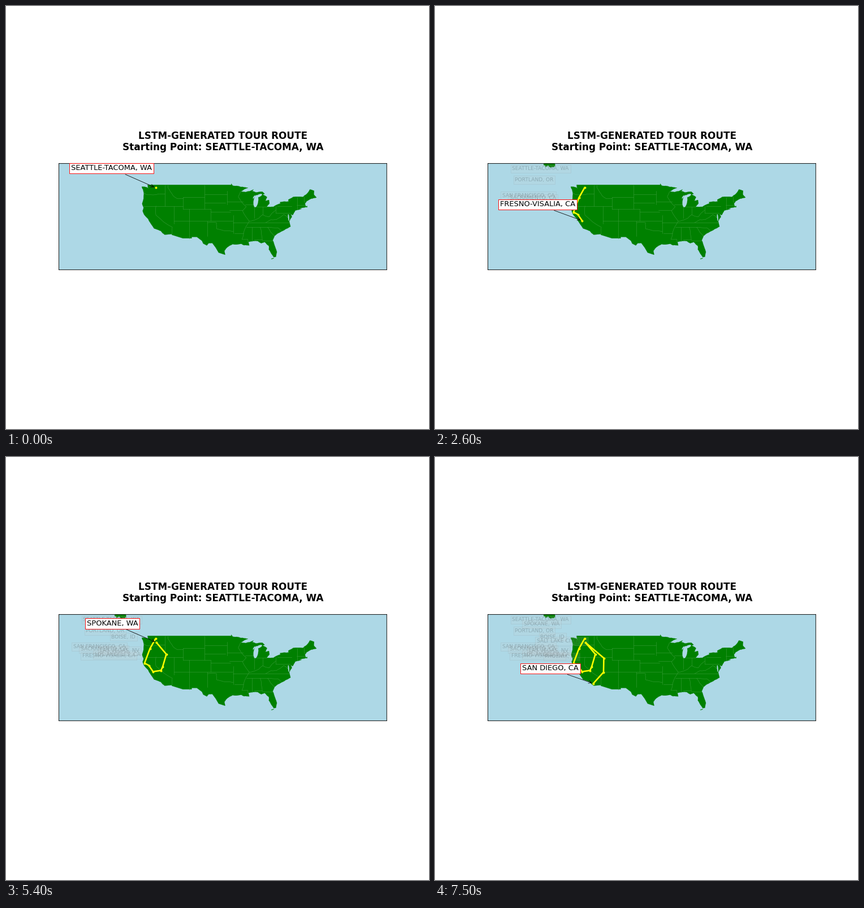
These frames come from a looping animation (748 by 748 pixels, 8 s). A matplotlib script:

```python
import numpy as np
import matplotlib.pyplot as plt
from matplotlib.animation import FuncAnimation

SIZE, DPI = 748, 93.5
LEFT, RIGHT, TOP, BOTTOM = 93.5, 673.3, 278.4, 466.4
STEP = 100
SEA, LAND, BORDER = "lightblue", "green", "#339a33"

# Key points as (longitude, latitude); rough() fills in the detail
PACIFIC = [
    (-122.76, 49), (-122.4, 47.5), (-122.8, 48.1), (-124.7, 48.38), (-124, 46.3),
    (-124.1, 44.4), (-124.55, 42.84), (-124.1, 41.5), (-124.4, 40.4), (-123.7, 38.9),
    (-122.5, 37.6), (-121.9, 36.5), (-120.6, 34.55), (-119.2, 34.1), (-118.4, 33.75),
    (-117.12, 32.53),
]
DESERT = [
    (-114.72, 32.72), (-114.8, 32.5), (-111.07, 31.33), (-108.2, 31.33), (-108.2, 31.78),
    (-106.5, 31.78), (-104.8, 30.5), (-104.4, 29.6), (-103.2, 28.98), (-102.6, 29.7),
    (-101.4, 29.77), (-100.3, 28.3), (-99.3, 26.6), (-97.15, 25.9),
]
GULF = [
    (-97.4, 27.2), (-96.4, 28.4), (-94.7, 29.4), (-91.8, 29.5), (-90.9, 29.05),
    (-89.2, 29), (-89.5, 30.1), (-86.3, 30.38), (-85.2, 29.7), (-84.1, 30.1),
    (-82.7, 28.8), (-82.7, 27.6), (-81.8, 26.1), (-81.1, 25.1),
]
ATLANTIC = [
    (-80.4, 25.2), (-80.05, 26.8), (-80.6, 28.4), (-81.45, 30.7), (-80.85, 32.1),
    (-79.2, 33.2), (-77.9, 33.9), (-76.5, 34.65), (-75.55, 35.25), (-76, 36.9),
    (-75.1, 38.4), (-75.5, 39.4), (-74.9, 38.95), (-74, 40.5), (-71.9, 41.05),
    (-73.6, 40.9), (-71.4, 41.45), (-70, 41.6), (-70.1, 42.05), (-70.5, 41.8),
    (-70.8, 42.8), (-70.2, 43.6), (-68.8, 44.4), (-66.97, 44.8),
]
NORTH = [
    (-67.8, 45.7), (-67.8, 47.07), (-69.2, 47.45), (-70.3, 45.9), (-71.5, 45),
    (-74.7, 45), (-76.3, 44.1), (-76.2, 43.5), (-79.05, 43.27), (-78.9, 42.85),
    (-81.2, 41.75), (-83.4, 41.7), (-82.5, 42.9), (-82.7, 44), (-83.9, 43.7),
    (-83.3, 44.9), (-84.8, 45.85), (-84.1, 46), (-84.8, 46.7), (-87, 46.5),
    (-88.2, 46.9), (-87.8, 47.45), (-90.4, 46.6), (-92, 46.75), (-89.6, 48),
    (-92, 48.3), (-94.6, 48.7), (-95.15, 49.38), (-95.15, 49),
]
ALASKA = [(-133.8, 56.3), (-133, 54.8), (-132.2, 55.4), (-131.5, 54.85), (-130.3, 54.8),
          (-130.1, 56.3)]

# Straight borders: (latitude, west, east) and (longitude, south, north)
PARALLELS = [
    (46, -119, -117), (42, -124.2, -111), (45, -111, -104), (41, -111, -102),
    (43, -104, -97), (45.9, -104, -96.5), (40, -102, -95.3), (43.5, -96.5, -91.2),
    (40.6, -95.7, -91.4), (37, -114, -94.6), (36.5, -94.6, -76), (35, -90.2, -83.1),
    (33, -94, -91.1), (31, -87.6, -85), (42.5, -90.6, -87.8), (41.7, -87, -83.5),
    (39.7, -80.5, -75.7), (42, -79.8, -75.3), (42.3, -73.5, -71), (30.6, -85, -81.5),
]
MERIDIANS = [
    (-117, 42, 49), (-114, 36.2, 42), (-111, 41, 45), (-109, 31.3, 41), (-104, 41, 49),
    (-102, 37, 41), (-103, 32, 37), (-96.5, 42.5, 47), (-94.5, 33, 39), (-87.5, 38, 41.7),
    (-84.8, 39.1, 41.7), (-88.3, 30.3, 35), (-80.5, 39.7, 42), (-73.4, 41.1, 45),
]
RIVERS = [
    [(-124, 46.25), (-122.8, 45.7), (-119, 46)],
    [(-116, 49), (-116, 48), (-114.4, 45.5), (-113, 44.45), (-111, 44.5)],
    [(-120, 42), (-120, 39), (-114.6, 35), (-114.7, 32.7)],
    [(-103, 36.5), (-100, 36.5), (-100, 34.5), (-94.5, 33.6)],
    [(-92.1, 46.7), (-92.8, 45), (-90.2, 41.8), (-91.4, 40.4), (-89.2, 37), (-91.1, 33),
     (-91.6, 31), (-89.7, 31), (-89.6, 30.2)],
    [(-89.2, 37), (-86, 38), (-84.8, 39.1), (-82.6, 38.4), (-80.5, 40.6)],
    [(-85.6, 35), (-85.1, 32.3), (-84.9, 30.7)],
    [(-80.9, 32.1), (-83.1, 35), (-79.7, 34.8), (-78.6, 33.9)],
    [(-83.7, 36.6), (-82, 37.5), (-80.3, 37.5), (-77.8, 39.2), (-76.5, 38.2)],
    [(-71.1, 45.3), (-71, 43.4), (-70.7, 43.1)],
]
# Open water: centre, half width, half height, tilt in degrees
WATER = [
    (-87, 43.6, 0.75, 2, -8), (-86, 45.4, 1.1, 0.4, 25), (-87.6, 45, 0.16, 0.6, -35),
    (-76.2, 38.2, 0.16, 1.1, 5),
]
# Stops with their stage position in pixels
STOPS = [
    ("SEATTLE-TACOMA, WA", 264.5, 321.3), ("PORTLAND, OR", 254.5, 339),
    ("SAN FRANCISCO, CA", 245, 364.5), ("SACRAMENTO, CA", 252.5, 368.5),
    ("FRESNO-VISALIA, CA", 260, 379.5), ("LOS ANGELES, CA", 274, 377.5),
    ("LAS VEGAS, NV", 277, 371), ("BOISE, ID", 283.5, 348.7),
    ("SPOKANE, WA", 266, 328), ("SALT LAKE CITY, UT", 298.5, 355.5),
    ("PHOENIX, AZ", 298, 380.5), ("SAN DIEGO, CA", 280, 400.5),
]

rng = np.random.default_rng(4)
plt.rcParams["font.family"] = "DejaVu Sans"
fig = plt.figure(figsize=(SIZE / DPI, SIZE / DPI), dpi=DPI, facecolor="white")
ax = fig.add_axes([LEFT / SIZE, 1 - BOTTOM / SIZE,
                   (RIGHT - LEFT) / SIZE, (BOTTOM - TOP) / SIZE])
ax.set(xlim=(LEFT, RIGHT), ylim=(BOTTOM, TOP), xticks=[], yticks=[], facecolor=SEA)
for spine in ax.spines.values():
    spine.set(linewidth=0.7, snap=False)


def project(points):
    lon, lat = np.array(points, float).T
    return 240 + (lon + 124.7) * 5.355, 316.2 + (49 - lat) * 5.355


def rough(points, amount=0.06, rounds=2):
    """Split every segment and push its middle sideways."""
    p = np.array(points, float)
    for _ in range(rounds):
        d = np.diff(p, axis=0)
        push = rng.uniform(-amount, amount, (len(d), 1))
        mid = p[:-1] + d / 2 + push * d[:, ::-1] * [1, -1]
        p = np.insert(p, range(1, len(p)), mid, axis=0)
    return p


def ellipse(lon, lat, rx, ry, tilt=0):
    t, a = np.linspace(0, 2 * np.pi, 40), np.radians(tilt)
    x, y = rx * np.cos(t), ry * np.sin(t)
    return np.column_stack([lon + x * np.cos(a) - y * np.sin(a),
                            lat + x * np.sin(a) + y * np.cos(a)])


def area(points, color):
    return ax.fill(*project(points), color=color, lw=0.2, zorder=1.5)[0]


def border(points):
    ax.plot(*project(points), color=BORDER, lw=0.5, zorder=1.6)


def label_spot(x, y):
    return 1.11 * x - 107, 1.098 * y - 65.8


def current_label(name, x, y):
    return ax.annotate(
        name, (x, y), label_spot(x, y), size=10, ha="center", va="center", zorder=6,
        bbox=dict(boxstyle="square,pad=0.22", fc="white", ec="red", lw=0.7),
        arrowprops=dict(arrowstyle="->", lw=0.6, color="black"))


def faded_label(name, x, y):
    tx, ty = label_spot(x, y)
    return ax.text(
        tx, ty + 1, name, size=7, ha="center", va="center", alpha=0.2, zorder=2.5,
        bbox=dict(boxstyle="square,pad=0.3", fc="lightgray", ec="gray", lw=0.7, alpha=0.13))


area(np.vstack([rough(PACIFIC), DESERT, rough(GULF), rough(ATLANTIC), rough(NORTH)]), LAND)
area(ellipse(-81.5, 24.65, 0.45, 0.08, 15), LAND)
alaska = area(rough(ALASKA, 0.25, 3), LAND)
for lat, west, east in PARALLELS:
    border([(west, lat), (east, lat)])
for lon, south, north in MERIDIANS:
    border([(lon, south), (lon, north)])
for river in RIVERS:
    border(rough(river))
for lake in WATER:
    area(ellipse(*lake), SEA).set_zorder(1.7)

fig.text((LEFT + RIGHT) / 2 / SIZE, 1 - 255 / SIZE,
         "LSTM-GENERATED TOUR ROUTE\nStarting Point: SEATTLE-TACOMA, WA",
         size=13, weight="bold", linespacing=1.15, ha="center", va="baseline")

current = [current_label(*stop) for stop in STOPS]
faded = [faded_label(*stop) for stop in STOPS]
route, = ax.plot([], [], color="yellow", lw=2, marker="o", ms=3, mew=0, zorder=3)
_, xs, ys = zip(*STOPS)


def update(frame):
    t = frame * STEP
    now = 0 if t < 500 else 1 + (t - 500) // 700
    route.set_data(xs[:now + 1], ys[:now + 1])
    for i, (big, small) in enumerate(zip(current, faded)):
        big.set_visible(i == now)
        small.set_visible(i < now)
    alaska.set_visible(now > 0)
    return [route, *current, *faded, alaska]


anim = FuncAnimation(fig, update, frames=8000 // STEP, interval=STEP,
                     repeat=True, repeat_delay=0)
plt.show()
```
